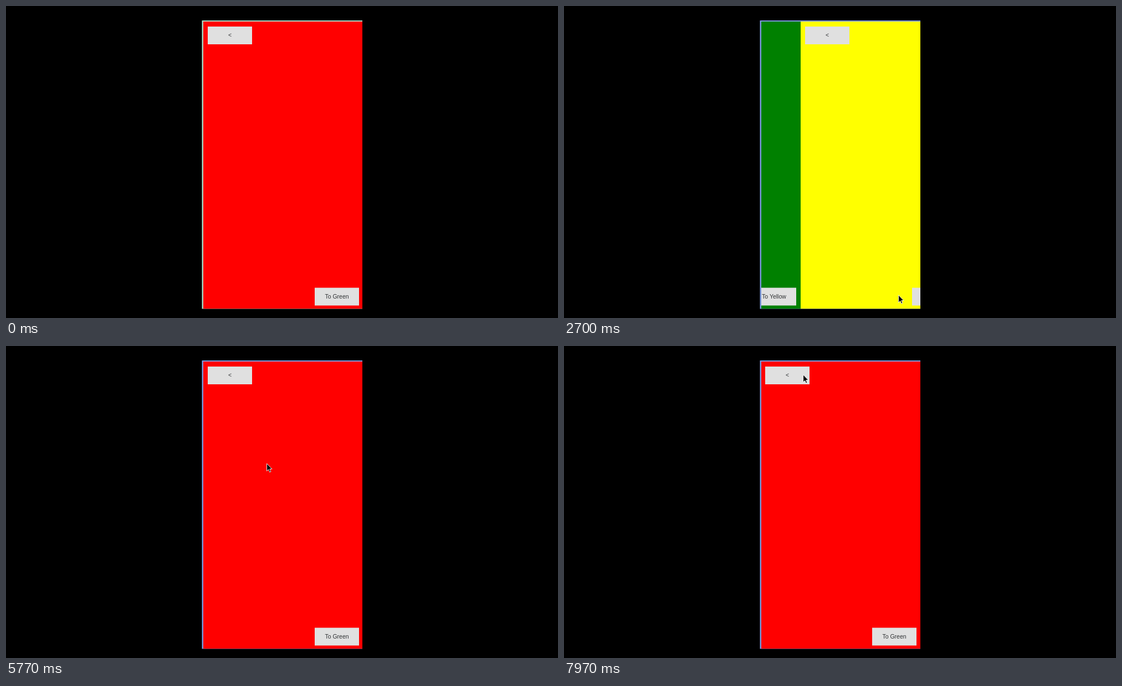
An HTML page for the animation above (8 s loop, 996 by 562 pixels).

```html
<!DOCTYPE html>
<html lang="en">
<head>
<meta charset="utf-8">
<title>Stacked pages</title>
<style>
  html, body { margin: 0; width: 100%; height: 100%; overflow: hidden; background: #000; }
  svg { display: block; width: 996px; height: 562px; }
  text { font: 10.5px "Liberation Sans", Arial, sans-serif; fill: #303234; text-anchor: middle; }
  .button rect { fill: #e0e0e0; }
  .button.pressed rect { fill: #cecece; }
  #frame { fill: #7b98dd; animation: focus 8s step-end infinite; }
  @keyframes focus {
    0% { fill: #a9d6c2; }
    15.875% { fill: #7b98dd; }
  }
</style>
</head>
<body>
<svg viewBox="0 0 996 562">
  <defs>
    <clipPath id="view"><rect x="356" y="28" width="287" height="517.5"/></clipPath>
    <g id="back" class="button">
      <rect x="364" y="37" width="80" height="32"/>
      <text x="404" y="56">&lt;</text>
    </g>
  </defs>
  <rect id="frame" x="353.5" y="26" width="289.5" height="519.5"/>
  <g id="pages" clip-path="url(#view)"></g>
  <use id="fixedBack" href="#back"/>
  <path id="cursor" d="M.6 .8V14.2L3.7 11.4L5.7 16.2L7.9 15.3L5.9 10.6H10Z"
        fill="#000" stroke="#fff" stroke-width=".9" stroke-linejoin="round"/>
</svg>
<script>
const LOOP = 8000, WIDTH = 289, HALF_LIFE = 70, SETTLE = 560;
const $ = id => document.getElementById(id);

// dir 1 pushes from the right, -1 pops back; left is the share still to travel
const slides = [
  { press: 1270, at: 1430, from: 'red', to: 'green', dir: 1, left: 0.2 },
  { press: 2530, at: 2700, from: 'green', to: 'yellow', dir: 1, left: 0.247 },
  { press: 3870, at: 4030, from: 'yellow', to: 'red', dir: 1, left: 0.247 },
  { press: 6350, at: 6500, from: 'red', to: 'green', dir: 1, left: 0.248 },
  { press: 7330, at: 7500, from: 'green', to: 'red', dir: -1, left: 0.247 }
];

// time, x, y of the pointer tip
const path = [
  [570, 592, 562], [1230, 603, 520], [5300, 603, 520], [5680, 449, 159],
  [6070, 598, 536], [6200, 598, 536], [6330, 589, 536], [6840, 589, 536],
  [7000, 586, 521], [7030, 584, 516], [7310, 431, 51], [LOOP, 431, 51]
];

const button = (x, y, label) => `<g class="button">
  <rect x="${x}" y="${y}" width="80" height="32"/>
  <text x="${x + 40}" y="${y + 19}">${label}</text></g>`;

function makePage(color, fill, next) {
  const page = document.createElementNS('http://www.w3.org/2000/svg', 'g');
  page.innerHTML = `<rect x="356" y="28" width="${WIDTH}" height="517.5" fill="${fill}"/>`
    + button(364, 37, '&lt;') + button(557, 507.5, 'To ' + next);
  $('pages').append(page);
  return page;
}

const pages = {
  red: makePage('red', '#f00', 'Green'),
  green: makePage('green', '#008000', 'Yellow'),
  yellow: makePage('yellow', '#ff0', 'Red')
};

function place(name, x) {
  pages[name].style.display = '';
  pages[name].setAttribute('transform', `translate(${x} 0)`);
}

function drawPages(t) {
  for (const page of Object.values(pages)) {
    page.style.display = 'none';
    for (const b of page.querySelectorAll('.button')) b.classList.remove('pressed');
  }
  const slide = slides.findLast(s => t >= s.at);
  const age = slide ? t - slide.at : 0;
  const moving = slide && age < SETTLE;
  if (moving) {
    const rest = Math.round(WIDTH * slide.left * 2 ** (-age / HALF_LIFE));
    place(slide.from, slide.dir * (rest - WIDTH));
    place(slide.to, slide.dir * rest);
  } else {
    place(slide ? slide.to : 'red', 0);
  }
  $('fixedBack').style.display = moving && slide === slides[0] ? '' : 'none';

  const held = slides.find(s => t >= s.press && t < s.at);
  if (held) {
    const index = held.dir > 0 ? 1 : 0;
    pages[held.from].querySelectorAll('.button')[index].classList.add('pressed');
  }
}

function drawCursor(t) {
  const i = path.findLastIndex(p => t >= p[0]);
  $('cursor').style.display = i < 0 ? 'none' : '';
  if (i < 0) return;
  const a = path[i], b = path[i + 1] || a;
  const k = a === b ? 0 : (t - a[0]) / (b[0] - a[0]);
  const ease = k * k * (3 - 2 * k);
  const mix = n => Math.round(a[n] + (b[n] - a[n]) * ease);
  $('cursor').setAttribute('transform', `translate(${mix(1)} ${mix(2)})`);
}

const start = performance.now();
function draw() {
  const t = Math.max(0, performance.now() - start) % LOOP;
  drawPages(t);
  drawCursor(t);
  requestAnimationFrame(draw);
}
draw();
</script>
</body>
</html>
```
